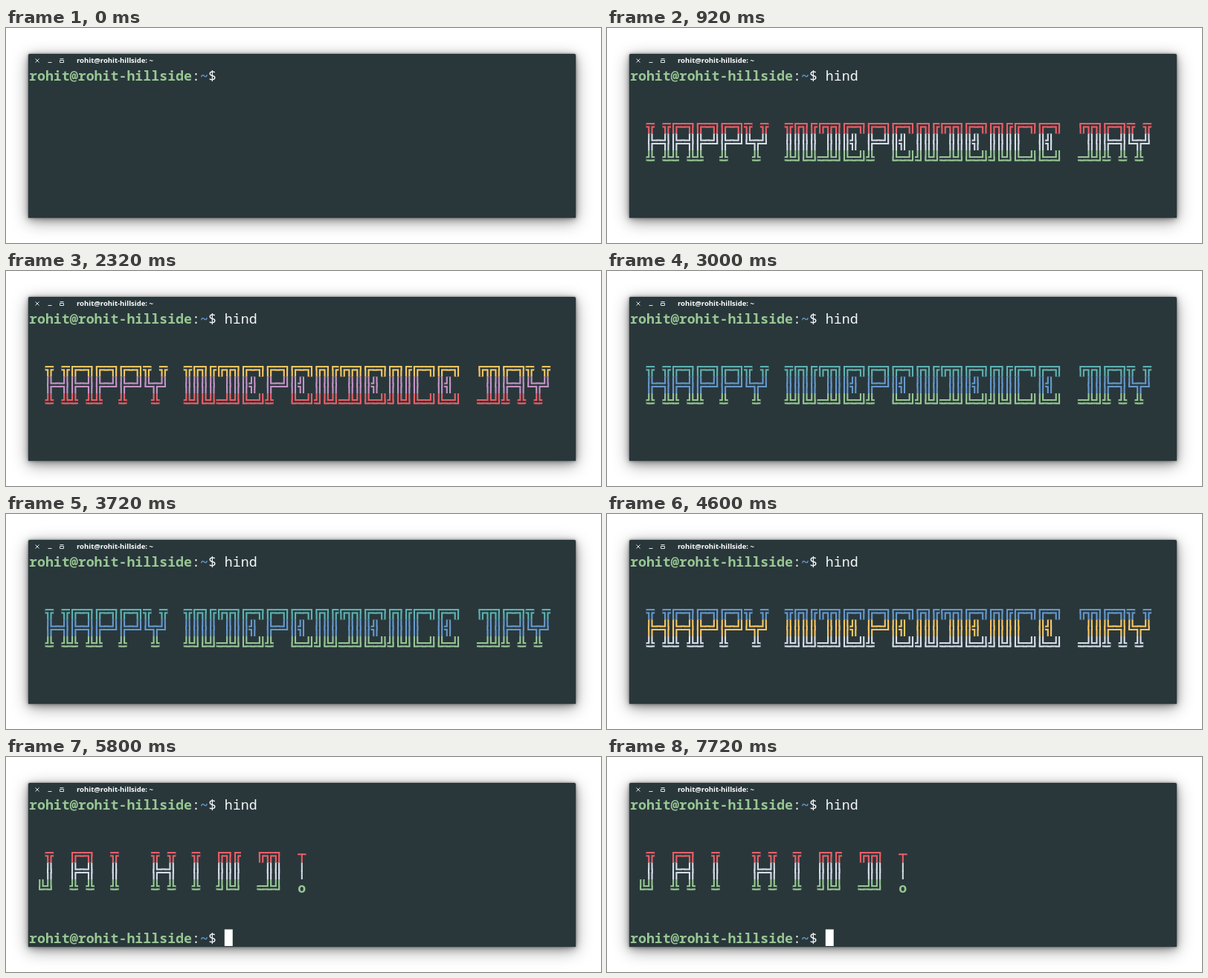
Animation of 800 by 290 pixels, one loop 7800 ms. Source, as an HTML page with a canvas:

```html
<!DOCTYPE html>
<html lang="en">
<head>
<meta charset="utf-8">
<title>Terminal greeting</title>
<style>
  html, body { margin: 0; width: 100%; height: 100%; overflow: hidden; background: #fff; }
  #win {
    position: absolute; left: 30px; top: 35px; width: 736px; height: 221px;
    background: #29373b; border-radius: 2px 2px 0 0;
    box-shadow: 0 0 3px rgba(0,0,0,.55), 0 2px 10px rgba(0,0,0,.32), 0 5px 22px rgba(0,0,0,.4);
    border-top: 1px solid #222f33; box-sizing: border-box;
  }
  canvas { position: absolute; left: 0; top: 0; }
  #title {
    position: absolute; left: 95px; top: 37px; color: #fff; white-space: pre;
    font: bold 9.5px/14px "Open Sans", "Noto Sans", sans-serif;
  }
  svg { position: absolute; left: 36px; top: 38px; fill: none; stroke: #dfe3e3; }
  .line {
    position: absolute; left: 31px; color: #f4f6f6; white-space: pre;
    font: 18.25px/22.5px "Noto Sans Mono", "DejaVu Sans Mono", monospace;
  }
  .line b { color: #6699cc; }
  .line b:first-child { color: #99c794; }
</style>
</head>
<body>
<div id="win"></div>
<svg width="50" height="14">
  <path d="M3.5 3.5l5 5m0-5l-5 5M20.5 8.5h5M36.5 3.5h5M36.5 5.5h5v3h-5z"/>
</svg>
<div id="title">rohit@rohit-hillside: ~</div>
<div class="line" style="top:52.5px"><b>rohit@rohit-hillside</b>:<b>~</b>$ <span id="cmd"></span></div>
<div class="line" id="next" style="top:232.5px"><b>rohit@rohit-hillside</b>:<b>~</b>$ </div>
<canvas id="cv" width="800" height="290"></canvas>
<script>
const cmd = document.getElementById('cmd'), next = document.getElementById('next');
const ctx = document.getElementById('cv').getContext('2d');
const LOOP = 7800, X0 = 31, Y0 = 52.5, CW = 10.95, CH = 22.5;
const BG = '#29373b';

// Terminal palette, 1 to 7
const PAL = ['', '#ec5f67', '#99c794', '#fac863', '#6699cc', '#c594c5', '#5fb3b3', '#d8dee9'];
// Palette digits for the top, middle and bottom row
const SCHEMES = ['642', '351', '437', '172', '514', '263', '745', '316', '627', '153', '471'];

const FONT = {
  H: ['╦ ╦', '╠═╣', '╩ ╩'], A: ['╔═╗', '╠═╣', '╩ ╩'], P: ['╔═╗', '╠═╝', '╩  '],
  Y: ['╦ ╦', '╚╦╝', ' ╩ '], I: ['╦', '║', '╩'], N: ['╔╗╔', '║║║', '╝╚╝'],
  D: ['╔╦╗', ' ║║', '═╩╝'], E: ['╔═╗', '║╣ ', '╚═╝'], C: ['╔═╗', '║  ', '╚═╝'],
  J: [' ╦', ' ║', '╚╝'], '!': ['┬', '│', 'o']
};
const ARMS = {
  '═': 'LR', '║': 'UD', '╔': 'RD', '╗': 'LD', '╚': 'RU', '╝': 'LU',
  '╠': 'RUD', '╣': 'LUD', '╦': 'LRD', '╩': 'LRU', '┬': 'LRD', '│': 'UD'
};

const banner = (text, gap) => [0, 1, 2].map(r => text.split(' ')
  .map(word => [...word].map(c => FONT[c][r]).join(gap)).join(gap + '  '));
const GREETING = banner('HAPPY INDEPENDENCE DAY', '');
const FINALE = banner('JAI HIND!', '  ');

// One pass over a box character: bars of half width h along its arms
function bars(x, y, ch, h) {
  const arms = ARMS[ch], cx = x + CW / 2, cy = y + CH / 2;
  const has = a => arms.includes(a);
  const l = has('L') ? x - .3 : cx - h, r = has('R') ? x + CW + .3 : cx + h;
  const t = has('U') ? y : cy - h, b = has('D') ? y + CH : cy + h;
  ctx.fillRect(l, cy - h, r - l, 2 * h);
  ctx.fillRect(cx - h, t, 2 * h, b - t);
}

function drawBanner(rows, col, scheme) {
  rows.forEach((row, r) => {
    const y = Y0 + (r + 3) * CH;
    const each = fn => [...row].forEach((ch, i) => fn(ch, X0 + (col + i) * CW));
    ctx.fillStyle = PAL[scheme[r]];
    each((ch, x) => {
      if (ch === 'o') ctx.fillText(ch, x, y + 18.3);
      else if (ARMS[ch]) bars(x, y, ch, '┬│'.includes(ch) ? 1 : 3.2);
    });
    // Hollow out the bars to leave double lines
    ctx.fillStyle = BG;
    each((ch, x) => { if (ARMS[ch] && !'┬│'.includes(ch)) bars(x, y, ch, 1.1); });
  });
}

function cursor(col, row, hollow) {
  const x = X0 + col * CW, y = Y0 + row * CH;
  ctx.fillStyle = ctx.strokeStyle = '#fff';
  if (hollow) ctx.strokeRect(x + .5, y + .5, CW - 1, CH - 1);
  else ctx.fillRect(x, y, CW, CH);
}

function draw(t) {
  ctx.clearRect(0, 0, 800, 290);
  ctx.font = 'bold 18.25px "Noto Sans Mono", "DejaVu Sans Mono", monospace';
  const typed = Math.min(4, Math.max(0, Math.floor(t / 80) - 1));
  cmd.textContent = 'hind'.slice(0, typed);
  next.style.visibility = t < 5800 ? 'hidden' : 'visible';

  if (t < 80) return;
  if (t < 600) cursor(24 + typed, 0);
  else if (t < 880) cursor(0, 1);
  else if (t < 5800) {
    // 15 colour changes per second, shown on a 40 ms clock
    const tick = Math.floor(t / 40) - 41;
    const step = Math.max(-10, Math.ceil(tick * 3 / 5) - 1);
    drawBanner(GREETING, 2, SCHEMES[(step + 13) % 11]);
  } else {
    drawBanner(FINALE, 1, '172');
    if (t < 6320 || t >= 6520) cursor(24, 8, t >= 6520 && t < 7720);
  }
}

const start = performance.now();
(function frame() {
  draw((performance.now() - start) % LOOP);
  requestAnimationFrame(frame);
})();
</script>
</body>
</html>
```
